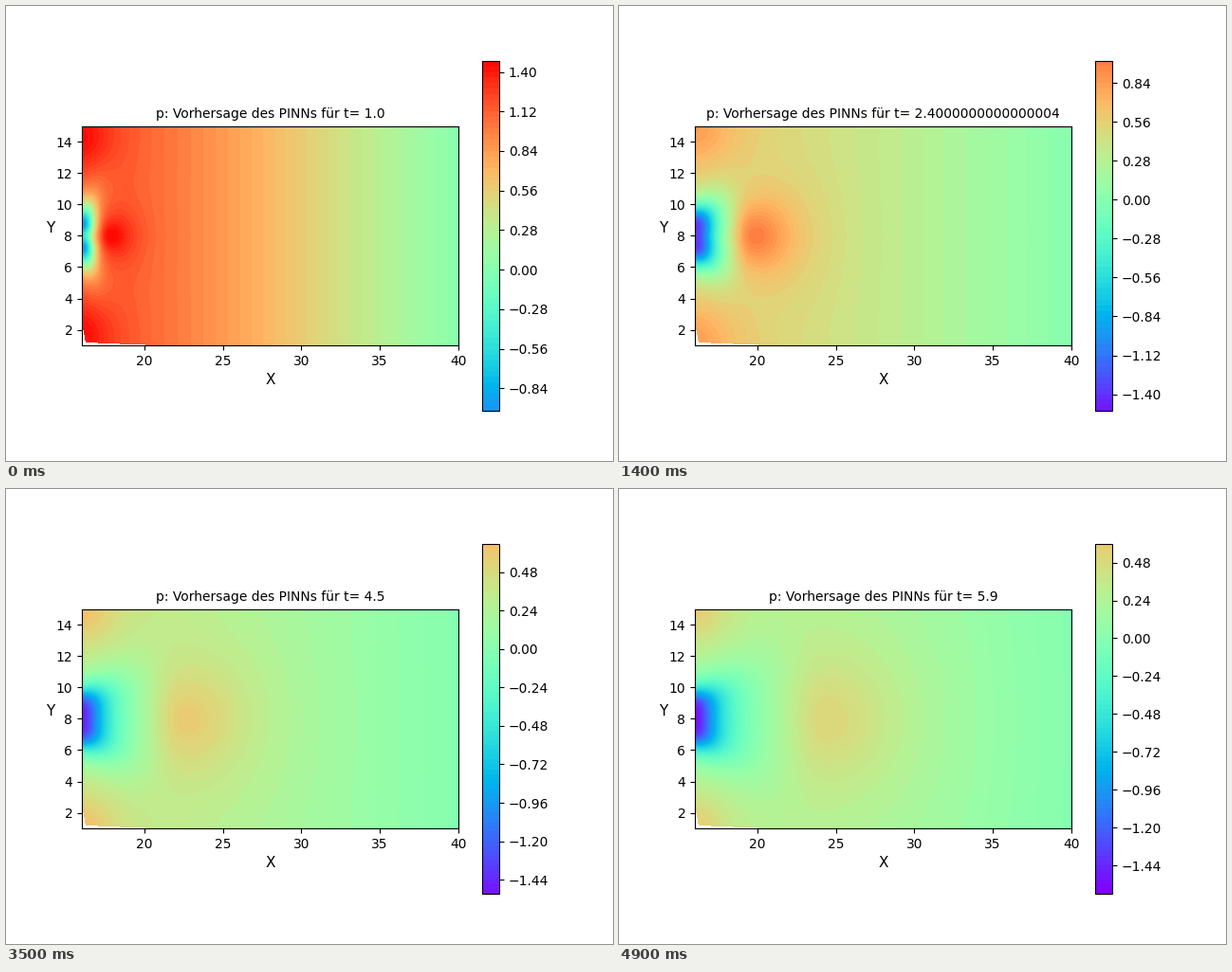
Recreate the animation shown at these times as a matplotlib script. Size 640 by 480 pixels, loop 5 s.

```python
import math

import matplotlib.pyplot as plt
import numpy as np
from matplotlib.animation import FuncAnimation

FRAMES = 50
INTERVAL = 100

X, Y = np.meshgrid(np.linspace(16, 40, 161), np.linspace(1, 15, 85))


def settle(start, end, rate, age):
    """Exponential approach from start to end."""
    return end + (start - end) * math.exp(-rate * age)


def bump(dx, dy):
    return np.exp(1 - np.sqrt(1 + dx**2 + dy**2))


def far_field(x, t):
    """Falls linearly to the outlet and levels off towards the inlet."""
    distance, limit = 40 - x, 23 - 1.2 * t
    slope = 0.058 * t**-0.72
    return slope * distance / (1 + (distance / limit)**6)**(1 / 6)


def peaks(t):
    """Lowest pressure, pressure at the front and in the corners."""
    age = t - 1
    low = settle(-0.98, -1.4825, 4, age) - 0.00093 * age**3
    front = max(1.414 - 0.185 * t + 0.23 * math.exp(-3.7 * age),
                0.8 - 0.05 * t)
    corner = 0.9 - 0.055 * t + 0.61 * math.exp(-1.5 * age)
    return low, front, corner


def pressure(t):
    age = t - 1
    low, front_peak, corner_peak = peaks(t)
    split = 0.25 * math.exp(-1.3 * age)
    depth = (far_field(16, t) - low) * (1 + 0.25 * split)
    length = settle(0.75, 1.65, 1, age)
    power = settle(3, 1.7, 0.7, age)

    def background(x, y):
        u, v = x - 16, np.abs(y - 8)
        decay = 1 + (u / length)**power + (v / (1.85 + 0.2 * u))**3.8
        notch = 1 - split * np.exp(-(v / 0.5)**2)
        return far_field(x, t) - depth * notch / decay

    front_x = 17.7 + 1.32 * age
    size = 0.5 + 0.3 * age
    reach = np.where(X < front_x, 0.9, 1.75) * size
    front = front_peak - background(front_x, 8)

    corner_v = settle(6.2, 7, 1, age)
    corner = corner_peak - background(16, 8 + corner_v)

    p = background(X, Y)
    p += front * bump((X - front_x) / reach, (Y - 8) / (1.75 * size))
    p += corner * bump((X - 16) / 1.4, (np.abs(Y - 8) - corner_v) / 1.5)
    high = max(front_peak, corner_peak)
    return np.clip(p, low, high), low, high


def contour_levels(low, high):
    step = 0.04 if high - low > 2.43 else 0.03
    return np.arange(math.floor(low / step), math.ceil(high / step) + 1) * step


fig = plt.figure(figsize=(6.4, 4.8), dpi=100)


def draw(i):
    t = 1 + i * 0.1
    p, low, high = pressure(t)
    fig.clf()
    ax = fig.add_subplot()
    filled = ax.contourf(X, Y, p, levels=contour_levels(low, high),
                         cmap="rainbow", vmin=-1.6, vmax=1.5)
    # Gap in the mesh at the lower left
    ax.fill([16, 16.02, 16.2, 18, 20, 20, 16],
            [2.2, 2.2, 1.17, 1.08, 1.02, 1, 1],
            color="white", lw=0, antialiased=False, zorder=2)
    fig.colorbar(filled, ax=ax)
    ax.set(xlim=(16, 40), ylim=(1, 15), aspect="equal")
    ax.set_xlabel("X", fontsize=11)
    ax.set_ylabel("Y", fontsize=11, rotation=0)
    ax.set_title(f"p: Vorhersage des PINNs für t= {t}", fontsize=10)
    return []


anim = FuncAnimation(fig, draw, frames=FRAMES, interval=INTERVAL,
                     init_func=lambda: [], repeat=True)
plt.show()
```
